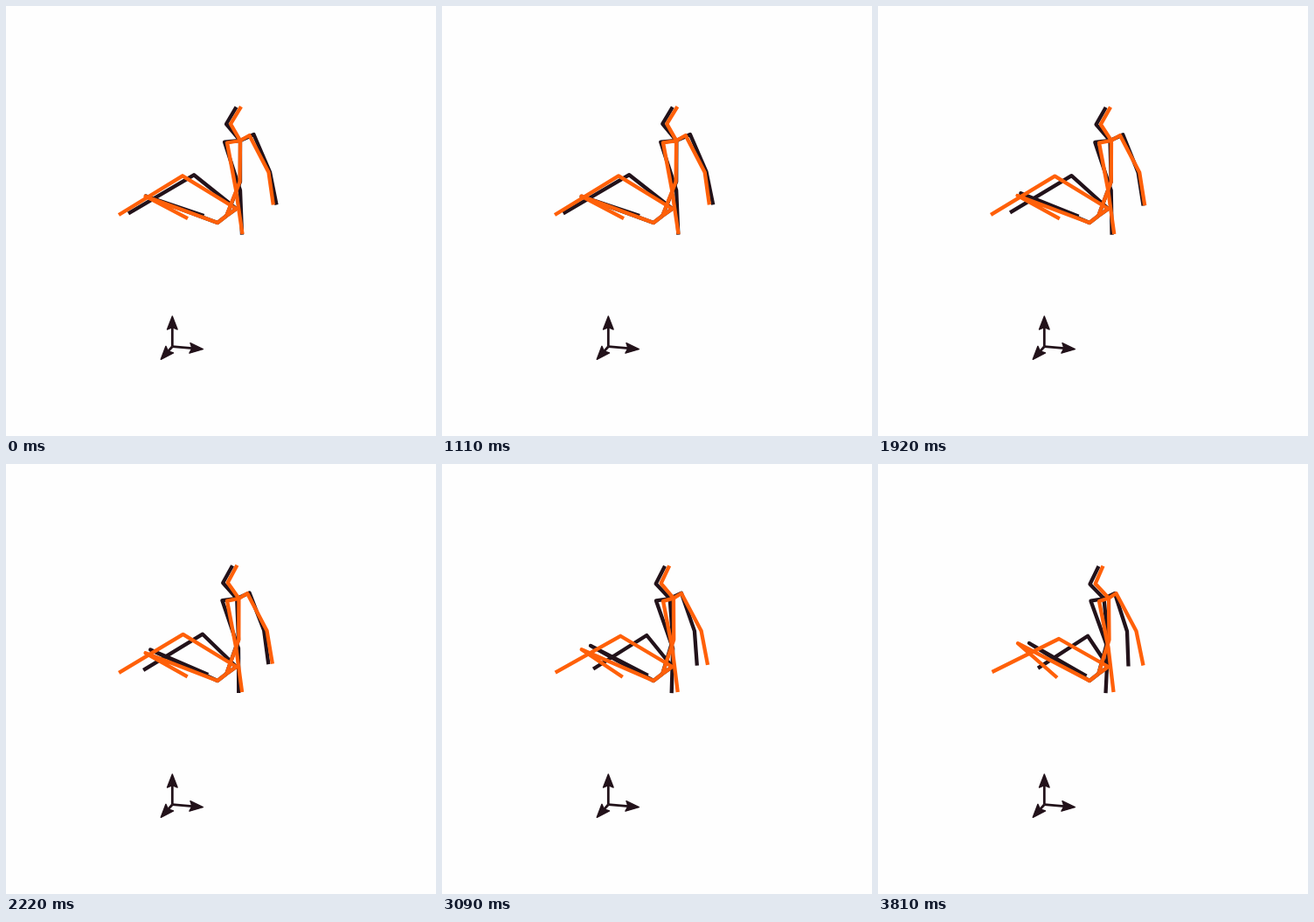
Write an HTML page with a canvas that moves like this. It is 492 px wide and 492 px high and loops after 3.84 s.

```html
<!DOCTYPE html>
<html lang="en">
<head>
<meta charset="utf-8">
<title>Two skeletons</title>
<style>
  html, body { margin: 0; width: 100%; height: 100%; overflow: hidden; background: #fefefe; }
  canvas { display: block; }
</style>
</head>
<body>
<canvas id="stage" width="492" height="492"></canvas>
<script>
const LOOP = 3840, STEP = 30;
const DARK = '#22121a', ORANGE = '#ff6009';
const ctx = document.getElementById('stage').getContext('2d');

// Lean back a little, then drift forward; the late ease stays put for longer.
const sway = p => p * p - 0.12 * Math.sin(2 * Math.PI * p);
const late = p => p ** 4;

// Joint: x, y, then how far it drifts over one loop.
const hips = { pelvis: [252.3, 240], rightHip: [263.5, 232], leftHip: [242, 248] };
const darkBody = {
  color: DARK,
  torso: {
    ease: sway,
    crown: [263.5, 115.7, -11, 1.3], chin: [252, 135, -9.5, 2.5],
    neck: [268, 154, -9.5, 0], spine: [268, 201, -5, 0],
    leftShoulder: [250, 155.7, -6.5, 1], leftElbow: [268, 211, -5, 0], leftHand: [270, 261.7, -9.5, 0.5],
    rightShoulder: [283.5, 147, -12.5, 1], rightElbow: [302, 190, -17, 1.5], rightHand: [309.5, 227.5, -23, 4]
  },
  legs: {
    ease: sway,
    rightKnee: [215, 193.3, 25, 3.5], rightFoot: [140, 237.3, 43, -3.7],
    leftKnee: [160, 217.5, 13, -12.5], leftFoot: [226.5, 240, 12, 2.5]
  }
};
const orangeBody = {
  color: ORANGE,
  torso: {
    ease: sway,
    crown: [269, 115.2, -11.5, 1.5], chin: [257, 135, -8.3, 2],
    neck: [268, 154, -4, -0.5], spine: [267.5, 201, -3, 0],
    leftShoulder: [253, 156.5, 0, 0.5], leftElbow: [263, 210, 0.5, 0], leftHand: [270.5, 261, -1, 0],
    rightShoulder: [278.5, 148, -6, 0], rightElbow: [300.5, 190.3, -5, 1], rightHand: [305.8, 227.5, -2.3, 3]
  },
  legs: {
    ease: late,
    rightKnee: [202, 194.3, 5, 5.7], rightFoot: [129, 239, 1.5, -1],
    leftKnee: [159.5, 217.7, 0.5, -12.5], leftFoot: [208, 243.2, -3, 1.3]
  }
};
const limbs = [
  ['crown', 'chin', 'neck', 'spine', 'pelvis'],
  ['neck', 'leftShoulder', 'leftElbow', 'leftHand'],
  ['neck', 'rightShoulder', 'rightElbow', 'rightHand'],
  ['pelvis', 'rightHip', 'rightKnee', 'rightFoot'],
  ['pelvis', 'leftHip', 'leftKnee', 'leftFoot']
];

function trace(points) {
  ctx.beginPath();
  points.forEach(([x, y]) => ctx.lineTo(x, y));
}

function drawBody({ color, torso, legs }, progress) {
  const pose = { ...hips };
  for (const { ease, ...joints } of [torso, legs]) {
    const amount = ease(progress);
    for (const name in joints) {
      const [x, y, dx, dy] = joints[name];
      pose[name] = [x + dx * amount, y + dy * amount];
    }
  }
  ctx.strokeStyle = color;
  ctx.lineWidth = 4.3;
  for (const limb of limbs) {
    trace(limb.map(name => pose[name]));
    ctx.stroke();
  }
}

// An axis along +x with a notched head, turned to its direction.
function drawAxis(length, angle) {
  ctx.save();
  ctx.translate(190.3, 389.7);
  ctx.rotate(angle);
  ctx.strokeStyle = ctx.fillStyle = DARK;
  ctx.lineWidth = 2.8;
  trace([[0, 0], [length - 12, 0]]);
  ctx.stroke();
  ctx.lineWidth = 1.4;
  trace([[length, 0], [length - 15, -5.8], [length - 12.5, 0], [length - 15, 5.8]]);
  ctx.closePath();
  ctx.fill();
  ctx.stroke();
  ctx.restore();
}

function render(now) {
  const time = Math.floor(now % LOOP / STEP) * STEP;
  const progress = time / (LOOP - STEP);
  ctx.fillStyle = '#fefefe';
  ctx.fillRect(0, 0, 492, 492);
  ctx.lineJoin = 'round';
  drawBody(darkBody, progress);
  drawBody(orangeBody, progress);
  drawAxis(34.7, -Math.PI / 2);
  drawAxis(35.2, 0.085);
  drawAxis(19.6, 2.3);
  requestAnimationFrame(() => render(performance.now()));
}
render(0);
</script>
</body>
</html>
```
